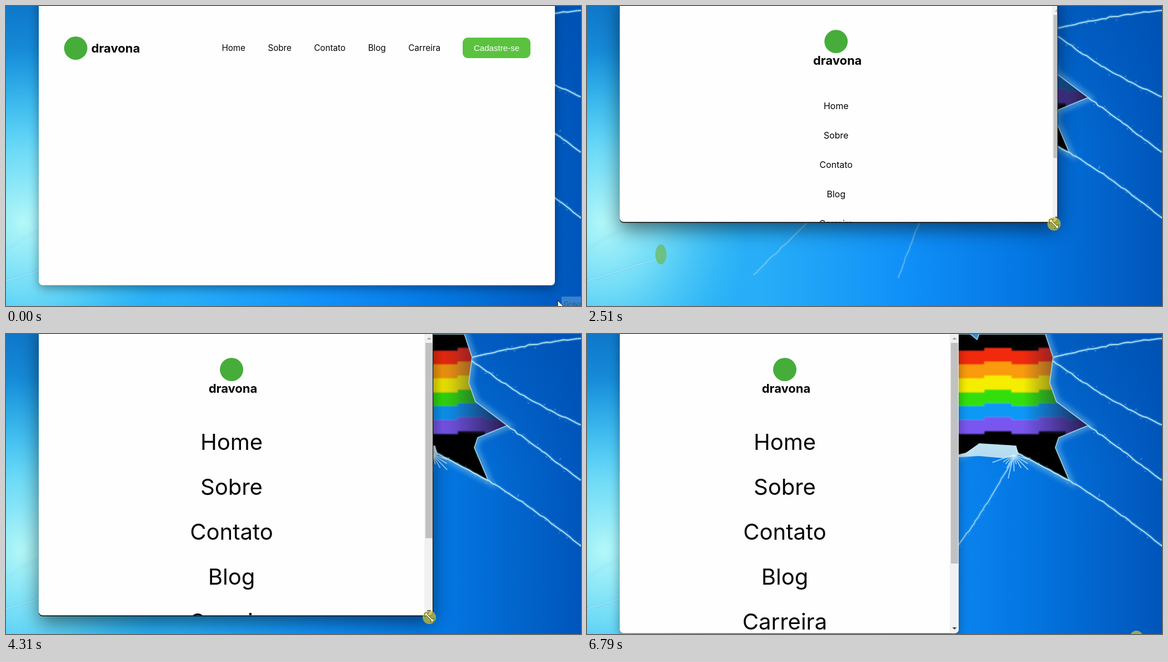
Recreate the animation shown at these times as an HTML page. Size 1035 by 541 pixels, loop 6.85 s.

```html
<!DOCTYPE html>
<html lang="pt">
<head>
<meta charset="utf-8">
<title>Menu responsivo</title>
<style>
  html, body { margin: 0; width: 100%; height: 100%; overflow: hidden; }
  svg { display: block; width: 1035px; height: 541px; }
  text { font-family: Inter, "Open Sans", sans-serif; fill: #050505; }
  .brand { font-weight: 700; font-size: 22px; }
  .button { font: 15.1px "Liberation Sans", Arial, sans-serif; fill: #fff; }
  .hint { font: 12px "Open Sans", sans-serif; fill: #27527f; }
  .mid { text-anchor: middle; }
</style>
</head>
<body>
<svg viewBox="0 0 1035 541">
  <defs>
    <linearGradient id="sky">
      <stop offset="0" stop-color="#24b2f0"/>
      <stop offset=".3" stop-color="#28aef8"/>
      <stop offset=".55" stop-color="#1090f8"/>
      <stop offset=".75" stop-color="#0478e4"/>
      <stop offset="1" stop-color="#0055ba"/>
    </linearGradient>
    <linearGradient id="dusk" x2="0" y2="1">
      <stop offset="0" stop-color="#0050b0" stop-opacity=".6"/>
      <stop offset=".45" stop-color="#0050b0" stop-opacity="0"/>
    </linearGradient>
    <radialGradient id="glow" gradientUnits="userSpaceOnUse" cx="0" cy="0" r="1"
      gradientTransform="translate(30 390) scale(260 310)">
      <stop offset="0" stop-color="#b4f8f8"/>
      <stop offset=".4" stop-color="#84e6f8" stop-opacity=".8"/>
      <stop offset="1" stop-color="#50d0f8" stop-opacity="0"/>
    </radialGradient>
    <linearGradient id="fade" gradientUnits="userSpaceOnUse" x1="785" x2="900">
      <stop offset="0" stop-color="#1c1840" stop-opacity="0"/>
      <stop offset="1" stop-color="#1c1840" stop-opacity=".9"/>
    </linearGradient>
    <filter id="soft"><feGaussianBlur stdDeviation="1.3"/></filter>
    <filter id="haze"><feGaussianBlur stdDeviation="4"/></filter>
    <filter id="blur" filterUnits="userSpaceOnUse" x="-80" y="-80" width="1200" height="720">
      <feGaussianBlur id="softness"/>
    </filter>
    <clipPath id="holeClip">
      <path id="rim" d="M640 0H690L702 10 706 0H825L839 42 833 88 845 122 902 165 849 187 843 205 868 264 775 215 772 202 706 198 682 216 640 224Z"/>
    </clipPath>
    <clipPath id="pageClip"><rect id="pageShape" x="59" y="-20" rx="7"/></clipPath>
  </defs>

  <rect width="1035" height="541" fill="url(#sky)"/>
  <rect width="1035" height="541" fill="url(#dusk)"/>
  <rect width="1035" height="541" fill="url(#glow)"/>
  <use href="#rim" fill="none" stroke="#78bce4" stroke-width="14" opacity=".5" filter="url(#haze)"/>
  <g clip-path="url(#holeClip)">
    <rect x="630" width="300" height="300"/>
    <g id="stripes" filter="url(#soft)"></g>
    <rect x="630" y="22" width="300" height="158" fill="url(#fade)"/>
  </g>
  <use href="#rim" fill="none" stroke="#a8dcee" stroke-width="1.8" opacity=".85"/>
  <path d="M640 224L682 214 706 198 772 202 778 218 750 224 705 220Z" fill="#d4eef2" opacity=".85"/>
  <g id="cracks" fill="none" stroke-linejoin="round"></g>
  <ellipse cx="133" cy="448" rx="10" ry="18" fill="#6fb548" opacity=".65"/>

  <rect id="shadow" x="59" y="-20" rx="8" filter="url(#blur)"/>
  <rect id="edge" x="59" y="-20" rx="7"/>
  <g clip-path="url(#pageClip)">
    <rect width="1035" height="541" fill="#fefefe"/>
    <circle id="logo" r="21" fill="#46ad3b"/>
    <text id="brand" class="brand">dravona</text>
    <g id="nav"></g>
    <g id="signup">
      <rect x="-166" y="57" width="122" height="37" rx="9" fill="#5bc240"/>
      <text class="button mid" x="-105" y="81">Cadastre-se</text>
    </g>
    <g id="scroll">
      <rect y="-2" width="17" height="560" fill="#f1f1f1"/>
      <rect id="thumb" x="2" y="16" width="13" fill="#c1c1c1"/>
      <path d="M4.500 10l4-4 4 4z" fill="#a3a3a3"/>
      <path id="down" d="M4.500-2l4 4 4-4z" fill="#454545"/>
    </g>
  </g>

  <g id="tip">
    <rect x="1000" y="524" width="40" height="20" fill="#4a90d2" opacity=".75"/>
    <text class="hint" x="1004" y="542">Grava</text>
  </g>
  <g id="pointer">
    <circle id="press" r="12" fill="#c2bd3a" opacity=".78"/>
    <path id="resize" d="M-8-8h7l-2.500 2.500 9 9 2.500-2.500v7h-7l2.500-2.500-9-9-2.500 2.500z"
      fill="#fff9d0" stroke="#4c4a18"/>
    <path id="arrow" d="M0 0v17l4-4 3 6 3-1-3-6h5z" fill="#fff" stroke="#111"/>
  </g>
</svg>
<script>
const LOOP = 6850;
const LEFT = 59;
const DRAG_START = 1280, DRAG_END = 5380;
const $ = id => document.getElementById(id);
const clamp = p => Math.min(1, Math.max(0, p));
const progress = (t, from, to) => clamp((t - from) / (to - from));
const lerp = (a, b, p) => a + (b - a) * p;

function set(node, attrs) {
  for (const key in attrs) node.setAttribute(key, attrs[key]);
  return node;
}
function add(parent, tag, attrs) {
  const node = document.createElementNS('http://www.w3.org/2000/svg', tag);
  return parent.appendChild(set(node, attrs));
}
function show(id, visible) {
  $(id).style.display = visible ? '' : 'none';
}

let seed = 11;
function random() {
  seed = (seed * 16807) % 2147483647;
  return seed / 2147483647;
}
const jitter = amount => (random() - .5) * amount;

// Wavy stripes: alternate blocks sit a little higher
function drawStripes() {
  const colours = ['#f22b0e', '#f99b08', '#f6ee06', '#30df08', '#0898f6', '#7957ef'];
  for (let block = 0; block < 6; block++) {
    colours.forEach((fill, i) => add($('stripes'), 'rect', {
      x: 666 + block * 49, y: 27 + i * 25 + (block % 2 ? -2 : 3), width: 49.5, height: 25.5, fill
    }));
  }
}

// A rough line from a to b that sags in the middle, with loose splinters near it
function crack([ax, ay], [bx, by], sag = 0, strength = 1) {
  const steps = Math.ceil(Math.hypot(bx - ax, by - ay) / 8);
  let line = `M${ax} ${ay}`, splinters = '';
  for (let k = 1; k <= steps; k++) {
    const p = k / steps;
    const x = lerp(ax, bx, p) + jitter(2);
    const y = lerp(ay, by, p) + sag * Math.sin(Math.PI * p) + jitter(2);
    line += `L${x} ${y}`;
    splinters += `M${x + jitter(14)} ${y + jitter(12)}l${jitter(6)} ${jitter(6)}`;
  }
  const stroke = (d, colour, width, opacity) => add($('cracks'), 'path',
    { d, stroke: colour, 'stroke-width': width, opacity: opacity * strength });
  stroke(line, '#58b4ee', 6, .3);
  stroke(line, '#c0ecf4', 2, .9);
  stroke(splinters, '#8cccf0', 1.4, .5);
}

function drawCracks() {
  crack([840, 42], [1035, 8], -4);
  crack([838, 48], [1035, 164], 8);
  crack([902, 165], [1035, 264]);
  crack([775, 215], [1035, 382], -11);
  crack([768, 224], [666, 384], 6, .75);
  crack([395, 392], [300, 485], 0, .45);
  crack([598, 392], [560, 490], 0, .4);
  crack([0, 496], [132, 454], 0, .45);
  crack([0, 438], [58, 405], 0, .25);
  for (let angle = .3; angle < 3; angle += .25) {
    const length = 14 + random() * 34;
    add($('cracks'), 'path', {
      d: `M768 218l${Math.cos(angle) * length} ${Math.sin(angle) * length}`,
      stroke: '#d8f4fa', 'stroke-width': 1.8, opacity: .7
    });
  }
}

const links = ['Home', 'Sobre', 'Contato', 'Blog', 'Carreira'].map(label => {
  const node = add($('nav'), 'text', {});
  node.textContent = label;
  return node;
});

// time, right edge, bottom edge
const DRAG = [
  [DRAG_START, 988, 504], [2640, 844, 388], [3230, 844, 388], [3640, 786, 445],
  [4040, 769, 509], [4310, 769, 509], [5120, 704, 547], [DRAG_END, 669, 540]
];

// Smooth monotone curve through the drag points; rests stay still
function corner(t) {
  const time = Math.min(DRAG_END, Math.max(DRAG_START, t));
  const i = Math.max(0, DRAG.findIndex(key => key[0] >= time) - 1);
  const span = DRAG[i + 1][0] - DRAG[i][0];
  const p = (time - DRAG[i][0]) / span;
  return [1, 2].map(axis => {
    const rate = k => k < 0 || k > DRAG.length - 2 ? 0
      : (DRAG[k + 1][axis] - DRAG[k][axis]) / (DRAG[k + 1][0] - DRAG[k][0]);
    const slope = k => rate(k - 1) * rate(k) > 0 ? (rate(k - 1) + rate(k)) / 2 : 0;
    const q = 1 - p;
    return DRAG[i][axis] * q * q * (1 + 2 * p) + DRAG[i + 1][axis] * p * p * (3 - 2 * p)
      + span * p * q * (slope(i) * q - slope(i + 1) * p);
  });
}

function layoutWide(right) {
  set($('logo'), { cx: 125.5, cy: 76 });
  set($('brand'), { x: 153.5, y: 84, class: 'brand' });
  let end = right - 206;
  [...links].reverse().forEach(link => {
    set(link, { y: 81, class: '', 'font-size': 15.2 });
    const start = end - link.getComputedTextLength();
    set(link, { x: start });
    end = start - 40.5;
  });
  set($('signup'), { transform: `translate(${right})` });
}

const COMPACT = { size: 16, first: 185.5, pitch: 53, content: 542, gutter: 10 };
const LARGE = { size: 40, first: 209, pitch: 81, content: 688, gutter: 16 };

function layoutStacked(right, bottom) {
  const menu = right - LEFT < 768 ? LARGE : COMPACT;
  const inner = right - menu.gutter, centre = (LEFT + inner) / 2;
  set($('logo'), { cx: centre, cy: 64 });
  set($('brand'), { x: centre + 2.5, y: 106, class: 'brand mid' });
  links.forEach((link, i) => set(link, {
    x: centre, y: menu.first + menu.pitch * i, class: 'mid', 'font-size': menu.size
  }));
  set($('scroll'), { transform: `translate(${inner})` });
  set($('thumb'), { height: (bottom - 33) * Math.min(1, bottom / menu.content) });
  set($('down'), { transform: `translate(0 ${bottom - 9})` });
}

function pointerAt(t, right, bottom) {
  if (t < 750) {
    const p = progress(t, 70, 470);
    return [lerp(993, 980, p), lerp(531, 500, p)];
  }
  if (t < 6040) return [right - 7, bottom + 2];
  const p = progress(t, 6040, 6450);
  return [lerp(660, 989, p), lerp(532, 547, p) - 65 * Math.sin(Math.PI * p)];
}

function render(t) {
  const [right, bottom] = corner(t);
  const width = right - LEFT, height = bottom + 20;
  const dragging = t >= DRAG_START && t < DRAG_END;
  const focused = t >= DRAG_START && t < 6790;
  const wide = width > 830;

  set($('shadow'), {
    width, height, opacity: focused ? .5 : .38,
    transform: `translate(0 ${focused ? 12 : 5})`
  });
  set($('softness'), { stdDeviation: focused ? 17 : 9 });
  set($('edge'), { width, height, fill: dragging ? '#000' : '#6f8794' });
  set($('pageShape'), {
    width: width - (dragging ? 1.3 : 0),
    height: height - (dragging ? 1.4 : .5)
  });

  show('signup', wide);
  show('scroll', !wide);
  if (wide) layoutWide(right);
  else layoutStacked(right, bottom);

  const resizing = t >= 750 && t < 5840;
  set($('pointer'), { transform: `translate(${pointerAt(t, right, bottom)})` });
  show('press', (resizing && t >= DRAG_START) || t >= 6790);
  show('resize', resizing);
  show('arrow', !resizing);
  $('tip').style.opacity = 1 - progress(t, 70, 470);
}

drawStripes();
drawCracks();

function tick(now) {
  render(now % LOOP);
  requestAnimationFrame(tick);
}
render(0);
requestAnimationFrame(tick);
</script>
</body>
</html>
```
